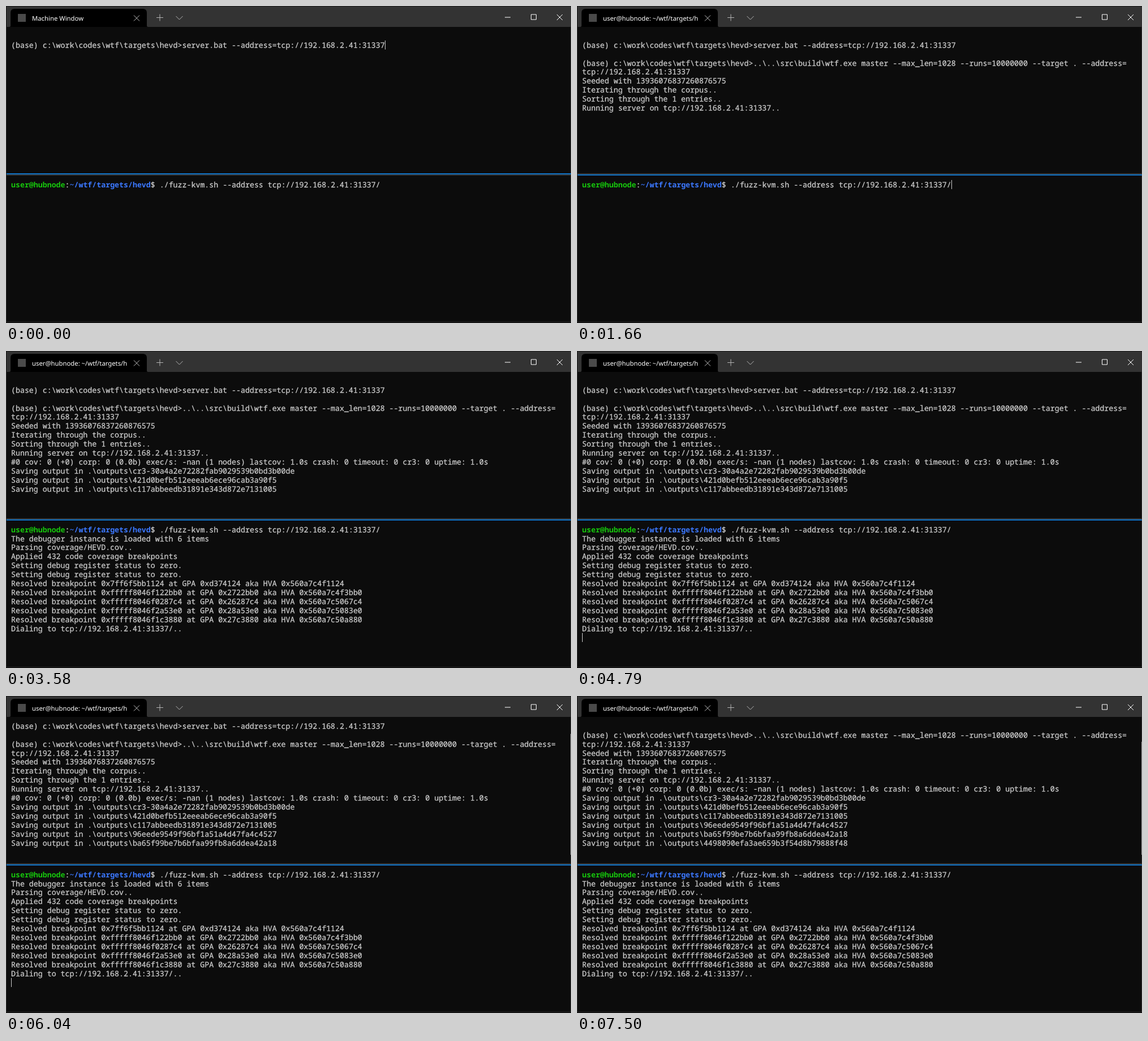
An HTML page with a canvas that plays this animation: 999 by 561 pixels, repeating every 8000 ms.

```html
<!DOCTYPE html>
<html lang="en">
<head>
<meta charset="utf-8">
<title>Terminal session</title>
<style>
  html, body { margin: 0; width: 100%; height: 100%; overflow: hidden; background: #000; }
  canvas { display: block; }
</style>
</head>
<body>
<canvas id="stage" width="999" height="561"></canvas>
<script>
const ctx = document.getElementById('stage').getContext('2d');
const LOOP = 8000;
const LEFT = 9, CELL = 7.962, ROW = 15.94, BASELINE = 12.6;
const TOP_PANE = 45.1, BOTTOM_PANE = 308, TOP_ROWS = 14;
const MONO = '13.27px "Noto Sans Mono", "DejaVu Sans Mono", monospace';
const SANS = '11.3px "Noto Sans", "Open Sans", sans-serif';
const TEXT = '#cccccc', GREEN = '#16c60c', BLUE = '#3b78ff', ACCENT = '#0f72c5';

const raw = String.raw;
const HOST = 'tcp://192.168.2.41:31337';
const PROMPT = raw`(base) c:\work\codes\wtf\targets\hevd>`;
const save = name => raw`Saving output in .\outputs` + '\\' + name;

// Each entry is [time at which the line appears, text].
const server = [
  [0, ''],
  [0, PROMPT + 'server.bat --address=' + HOST],
  [870, ''],
  [870, PROMPT + raw`..\..\src\build\wtf.exe master --max_len=1028 --runs=10000000 --target . --address=`],
  [870, HOST],
  [930, 'Seeded with 13936076837260876575'],
  [930, 'Iterating through the corpus..'],
  [930, 'Sorting through the 1 entries..'],
  [930, 'Running server on ' + HOST + '..'],
  [2580, '#0 cov: 0 (+0) corp: 0 (0.0b) exec/s: -nan (1 nodes) lastcov: 1.0s crash: 0 timeout: 0 cr3: 0 uptime: 1.0s'],
  [2650, save('cr3-30a4a2e72282fab9029539b0bd3b00de')],
  [2720, save('421d0befb512eeeab6ece96cab3a90f5')],
  [3580, save('c117abbeedb31891e343d872e7131005')],
  [5180, save('96eede9549f96bf1a51a4d47fa4c4527')],
  [6040, save('ba65f99be7b6bfaa99fb8a6ddea42a18')],
  [6170, save('4498090efa3ae659b3f54d8b79888f48')]
];

const resolved = (address, gpa, hva) =>
  `Resolved breakpoint 0x${address} at GPA 0x${gpa} aka HVA 0x560a7c${hva}`;
const client = [
  [2520, 'The debugger instance is loaded with 6 items'],
  [2520, 'Parsing coverage/HEVD.cov..'],
  [2520, 'Applied 432 code coverage breakpoints'],
  [2520, 'Setting debug register status to zero.'],
  [2520, 'Setting debug register status to zero.'],
  [2580, resolved('7ff6f5bb1124', 'd374124', '4f1124')],
  [2580, resolved('fffff8046f122bb0', '2722bb0', '4f3bb0')],
  [2580, resolved('fffff8046f0287c4', '26287c4', '5067c4')],
  [2580, resolved('fffff8046f2a53e0', '28a53e0', '5083e0')],
  [2580, resolved('fffff8046f1c3880', '27c3880', '50a880')],
  [2580, 'Dialing to ' + HOST + '/..']
];
const clientPrompt = [
  ['user@hubnode', GREEN, true],
  [':', TEXT],
  ['~/wtf/targets/hevd', BLUE, true],
  ['$ ./fuzz-kvm.sh --address ' + HOST + '/', TEXT]
];

const blinks = [470, 870, 3120, 3710, 4240, 4790, 5320, 5840, 6370, 6970, 7500];
const cursorOn = t => blinks.filter(b => b <= t).length % 2 === 0;
const visible = (lines, t) => lines.filter(([start]) => start <= t).map(([, text]) => text);

function rect(x, y, w, h, color) {
  ctx.fillStyle = color;
  ctx.fillRect(x, y, w, h);
}

function stroke(path, color) {
  ctx.strokeStyle = color;
  ctx.lineWidth = 1;
  ctx.stroke(new Path2D(path));
}

// Regular text gets a hairline outline to reach the terminal's stem weight.
function write(text, col, row, paneTop, color = TEXT, bold = false) {
  const x = LEFT + col * CELL, y = Math.round(paneTop + row * ROW + BASELINE);
  ctx.font = (bold ? 'bold ' : '') + MONO;
  ctx.fillStyle = ctx.strokeStyle = color;
  ctx.fillText(text, x, y);
  if (!bold) {
    ctx.lineWidth = 0.3;
    ctx.strokeText(text, x, y);
  }
}

function cursor(col, row, paneTop) {
  rect(Math.round(LEFT + col * CELL), Math.round(paneTop + row * ROW), 1, 16, TEXT);
}

function drawTitleBar(title) {
  rect(0, 0, 999, 37, '#1a1a1a');
  rect(1, 1, 998, 36, '#333333');
  ctx.fillStyle = '#000000';
  ctx.fill(new Path2D('M6 37 Q8 37 8 35 V12 Q8 5 15 5 H242 Q249 5 249 12 V35 Q249 37 251 37 Z'));
  rect(21, 14, 14, 14, '#4a4a4a');

  ctx.save();
  ctx.beginPath();
  ctx.rect(46, 8, 168, 26);
  ctx.clip();
  ctx.font = SANS;
  ctx.fillStyle = '#ffffff';
  ctx.fillText(title, 46, 26);
  ctx.restore();

  stroke('M226 16.5 l10 10 M236 16.5 l-10 10', '#c4c4c4');
  stroke('M266 20.5 h12 M272 14.5 v12', '#b4b4b4');
  stroke('M300.5 18 l6 6 l6 -6', '#b4b4b4');
  stroke('M882 20 h10 M928.5 15 h9 v9 h-9 z M974 15 l10 10 M984 15 l-10 10', '#ffffff');
}

function drawPanes(clientActive) {
  rect(0, 37, 999, 523, '#2b2b2b');
  rect(1, 37, 997, 522, '#0c0c0c');
  rect(1, 296, 998, 2, clientActive ? '#333333' : ACCENT);
  rect(1, 298, 998, 2, clientActive ? ACCENT : '#333333');
}

function drawServer(t, active) {
  const lines = visible(server, t);
  const scroll = Math.max(0, lines.length - TOP_ROWS);
  lines.slice(scroll).forEach((text, row) => write(text, 0, row, TOP_PANE));
  if (scroll) {
    const thumbTop = 53 + scroll * 14;
    rect(998, thumbTop, 1, 281 - thumbTop, '#a0a0a0');
  }
  if (active && cursorOn(t)) {
    if (t < 870) cursor(lines[1].length, 1, TOP_PANE);
    else cursor(0, lines.length, TOP_PANE);
  }
}

function drawClient(t, active) {
  let col = 0;
  for (const [text, color, bold] of clientPrompt) {
    write(text, col, 0, BOTTOM_PANE, color, bold);
    col += text.length;
  }
  const lines = visible(client, t);
  lines.forEach((text, i) => write(text, 0, i + 1, BOTTOM_PANE));
  if (active && cursorOn(t)) cursor(lines.length ? 0 : col, lines.length ? lines.length + 1 : 0, BOTTOM_PANE);
}

function titleAt(t) {
  if (t < 870) return 'Machine Window';
  return t < 1660 ? 'Machine Window - server.bat  --address' : 'user@hubnode: ~/wtf/targets/hevd';
}

function draw(t) {
  const clientActive = t >= 1660;
  rect(0, 0, 999, 561, '#000000');
  drawTitleBar(titleAt(t));
  drawPanes(clientActive);
  drawServer(t, !clientActive);
  drawClient(t, clientActive);
}

ctx.textRendering = 'geometricPrecision';
ctx.lineJoin = 'round';
const start = performance.now();
function tick() {
  draw((performance.now() - start) % LOOP);
  requestAnimationFrame(tick);
}
tick();
</script>
</body>
</html>
```
